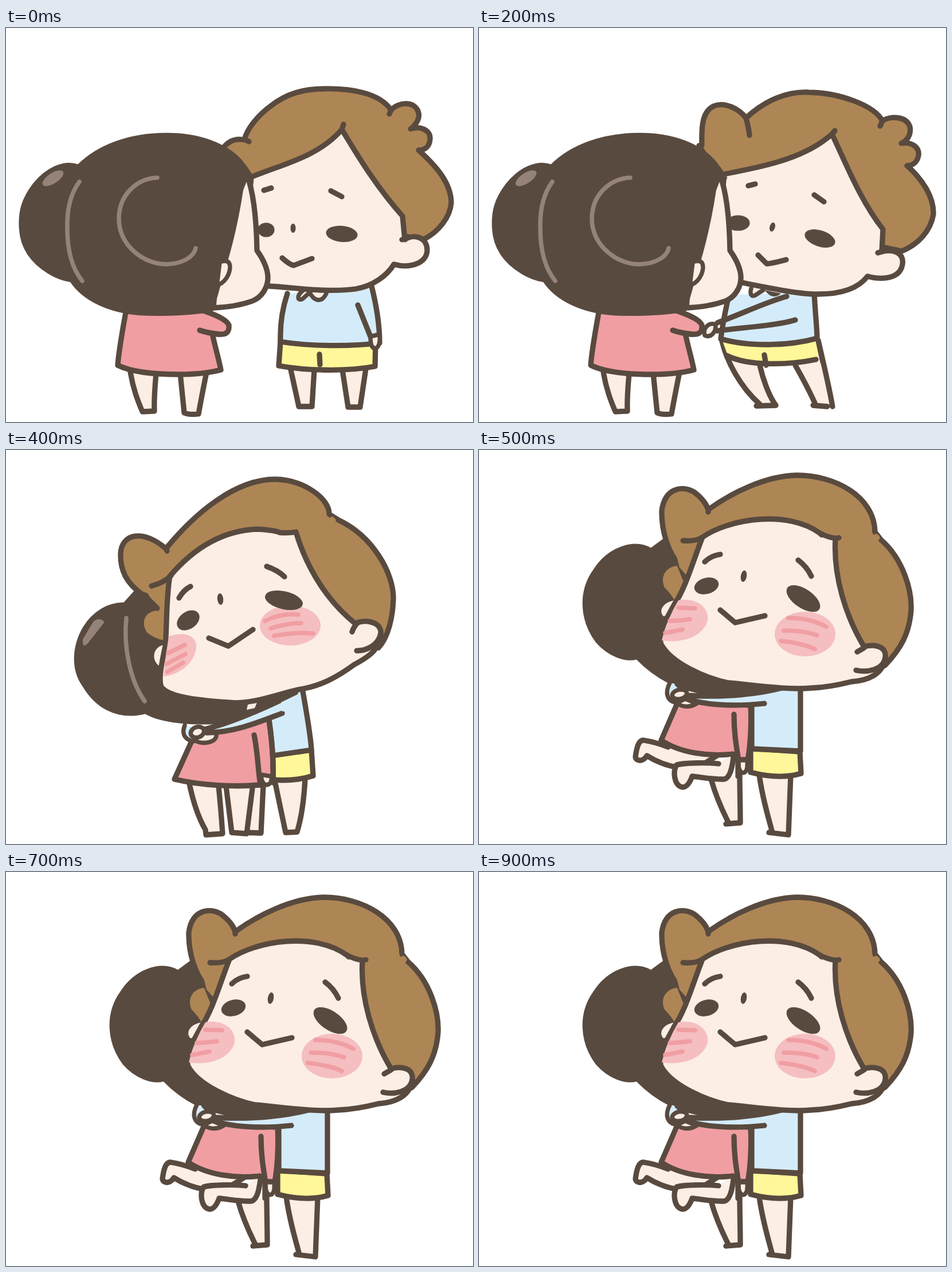
These frames come from a looping animation (815x687 px, 1 s). An HTML page without scripts:

```html
<!DOCTYPE html>
<html lang="en">
<head>
<meta charset="utf-8">
<title>Big hug</title>
<style>
  html, body { margin: 0; width: 100%; height: 100%; overflow: hidden; background: #fff; }
  svg { display: block; width: 100%; height: 100%; }
  svg { --ink: #594a3f; fill: none; stroke: var(--ink); stroke-width: 9.3; stroke-linecap: round; stroke-linejoin: round; }
  .skin { fill: #fceee5; }
  .hair { fill: #ae8655; }
  .dark { fill: var(--ink); stroke-width: 2.5; }
  .pink { fill: #f09ea2; }
  .blue { fill: #d4ecfa; }
  .gold { fill: #fff799; }
  .bare { stroke: none; }
  .thin { stroke-width: 7.5; }
  .dot { fill: var(--ink); stroke-width: 1.2; }
  .shine { stroke: #958379; stroke-width: 7.5; }
  .gloss { fill: #958379; stroke: none; }
  .blush { fill: #f5bec1; stroke: none; }
  .rub { stroke: #f09ea2; stroke-width: 7.5; }

  /* Each pose is held, then cut */
  .pose, .move { animation: 1s step-end infinite; }
  .pose { visibility: hidden; }
  .meet  { animation-name: meet; }
  .lean  { animation-name: lean; }
  .girl  { animation-name: girl; }
  .grab  { animation-name: grab; }
  .hug   { animation-name: hug; }
  .lift  { animation-name: lift; }
  .tilt  { animation-name: tilt; transform-origin: 560px 450px; }
  .sway  { animation-name: sway; transform-origin: 560px 660px; }
  .squash { animation-name: squash; transform-origin: 470px 675px; }
  @keyframes meet { 0% { visibility: visible } 20%, 100% { visibility: hidden } }
  @keyframes girl { 0% { visibility: visible } 30%, 100% { visibility: hidden } }
  @keyframes lean { 20% { visibility: visible } 30%, 100% { visibility: hidden } }
  @keyframes grab { 30% { visibility: visible } 40%, 100% { visibility: hidden } }
  @keyframes hug  { 40% { visibility: visible } 50%, 100% { visibility: hidden } }
  @keyframes lift { 50%, 100% { visibility: visible } }
  @keyframes tilt { 10%, 100% { transform: translate(5px, 4px) rotate(2.5deg) } }
  @keyframes sway { 10%, 100% { transform: skewX(6deg) } }
  @keyframes squash {
    0%, 50%, 70%, 90%, 100% { transform: none }
    60%, 80% { transform: scale(.99, .98) }
  }
</style>
</head>
<body>
<svg viewBox="0 0 815 687" preserveAspectRatio="none">

  <!-- Boy standing -->
  <g class="pose meet">
    <g class="move sway">
      <path class="skin" d="M497 596L511 660H534L538 596M587 596L597 661H618L628 594"/>
      <path class="gold" d="M479 546L476 589C520 597 590 600 644 590L645 548Z"/>
      <path class="blue" d="M491 463C482 490 478 520 479 547C530 555 600 556 652 549C652 520 648 490 638 450"/>
      <path class="skin thin" d="M636 538C636 555 640 560 646 558C652 555 653 546 652 534Z"/>
      <path d="M614 483L636 538M547 569L548 587"/>
      <path class="skin thin" d="M518 458C505 468 510 477 518 472L530 461C536 474 550 482 559 463"/>
    </g>
    <g class="move tilt">
      <path class="hair" d="M376 214C386 197 400 192 416 195C420 176 440 152 462 136C490 114 520 106 555 106C602 105 652 113 672 143C686 128 715 127 720 148C723 160 712 172 706 176C722 170 742 178 740 194C739 208 730 213 720 213C750 240 777 270 777 305C775 330 755 355 730 368L460 330Z"/>
      <path d="M416 194L424 198M672 143L669 150"/>
      <path class="skin" d="M428 260C480 238 545 225 586 177C605 207 640 270 692 328L696 369C712 358 735 365 735 387C735 410 705 420 677 412C665 432 640 450 610 455C560 462 500 452 459 450L415 400Z"/>
      <path d="M586 177L589 168M691 369L697 368"/>
      <g class="dot"><ellipse cx="454" cy="352" rx="14" ry="12"/><ellipse cx="501" cy="349" rx="4" ry="7.5"/><ellipse cx="586" cy="359" rx="27" ry="13.5" transform="rotate(5 586 359)"/></g>
      <path d="M450 283L463 279M567 284L586 294M482 401Q494 412 502 414L534 402"/>
    </g>
  </g>

  <!-- Boy reaching in -->
  <g class="pose lean">
    <path class="skin" d="M424 546C432 580 455 625 490 656L484 659L518 658C505 640 495 610 490 588"/>
    <path class="skin bare" d="M552 570V588C570 620 580 640 587 658L617 660C610 620 600 580 592 545Z"/>
    <path d="M552 588C570 620 580 640 587 656L583 658L608 660M592 545C600 580 610 620 617 660"/>
    <path class="gold bare" d="M424 543L434 571C470 590 540 588 591 578V541Z"/>
    <path class="blue" d="M436 465C430 495 425 515 422 542C470 556 540 555 590 541C590 525 587 500 585 462"/>
    <path d="M432 571C470 590 540 588 588 578M498 570L501 588M592 545L600 582"/>
    <path d="M416 514C460 498 500 478 537 468M416 528C460 522 520 519 552 509"/>
    <path class="skin thin" d="M413 517C400 512 390 525 394 536C405 541 414 530 413 517Z"/>
    <path class="skin thin" d="M475 454C472 465 476 469 482 466L496 457"/>
    <path class="dot" d="M500 458L526 463Q512 474 500 458Z"/>
    <path class="hair" d="M384 205L389 204C388 170 390 145 410 136C430 128 455 142 466 157C500 125 540 110 575 112C630 113 690 135 704 162C716 154 745 152 752 172C755 188 745 198 737 201C755 198 769 208 767 222C765 234 757 240 747 240C775 265 794 295 793 325C788 355 765 378 738 389L460 330Z"/>
    <path d="M466 157C469 168 471 178 472 187M704 162L700 171"/>
    <path class="skin" d="M428 255C470 245 560 235 616 185C640 235 665 300 705 351L703 390C725 385 742 393 739 412C735 437 705 440 678 433C665 450 640 464 592 464C560 465 500 452 459 444L415 390Z"/>
    <path d="M616 185L621 179M696 392L703 390"/>
    <g class="dot"><ellipse cx="452" cy="340" rx="20" ry="13"/><ellipse cx="512" cy="347" rx="4" ry="7.5" transform="rotate(15 512 347)"/><ellipse cx="595" cy="367" rx="27" ry="13.5" transform="rotate(18 595 367)"/></g>
    <path d="M470 275L482 272M585 291L602 303M487 396L502 411Q510 411 536 404"/>
  </g>

  <!-- Girl seen from behind -->
  <g class="pose girl">
    <path class="skin" d="M217 600C222 630 230 650 238 669L259 668C258 645 260 625 262 602M304 602L311 671Q320 675 336 673C340 650 345 625 350 600"/>
    <path class="pink" d="M210 490C203 530 197 560 195 588C215 598 250 604 302 604C335 604 360 600 375 596C372 580 366 560 360 533L372 534C385 535 390 530 389 518C385 508 365 500 345 493Z"/>
    <path d="M338 527Q352 532 372 534"/>
    <path class="skin" d="M420 255C432 285 437 330 438 388C448 402 456 418 457 433C458 452 446 470 430 476C408 484 385 487 362 488L370 380Z"/>
    <path class="dark" d="M126 239C100 230 70 245 48 272C28 298 22 320 24 350C26 385 45 410 75 428C90 437 105 441 113 442C135 475 180 496 235 500C280 502 330 500 360 493C368 470 373 450 378 430C392 390 408 325 416 258L432 262C426 250 420 242 410 230C385 203 340 184 280 184C215 184 160 205 126 239Z"/>
    <path class="skin thin" d="M377 407C391 403 394 415 388 430Q382 443 372 447"/>
    <path class="shine" d="M264 261C230 262 196 290 197 335C199 380 240 412 280 412C310 411 328 398 331 384M128 268C112 290 106 320 107 350C107 390 116 420 133 441"/>
    <ellipse class="gloss" cx="82" cy="262" rx="21" ry="9" transform="rotate(-33 82 262)"/>
  </g>

  <!-- Grab -->
  <g class="pose grab">
    <path class="skin" d="M415 578C420 620 430 640 432 656H450C452 630 452 610 454 584M512 588L516 668L541 667C546 640 548 610 549 578"/>
    <path class="gold" d="M410 530L414 573C450 585 490 592 515 590C540 586 555 575 559 566L556 532Z"/>
    <path class="blue bare" d="M390 440L416 530C440 542 470 545 488 545L555 533L547 455Z"/>
    <path d="M547 458C555 500 558 530 559 566M420 530C440 542 470 545 488 545M494 543L555 533M444 560L446 574"/>
    <path class="skin" d="M270 600C275 630 280 655 287 672L314 672L307 673C312 650 314 630 316 604M355 604L362 676L390 675L394 602"/>
    <path class="pink" d="M276 455C268 510 258 550 250 582C265 597 300 607 350 608C380 606 400 602 408 598C409 545 400 500 390 453Z"/>
    <path class="skin thin" d="M390 553C394 565 397 572 403 572C412 570 412 562 407 555Z"/>
    <path d="M380 522Q386 543 392 558M409 455L406 475"/>
    <path class="dark" d="M200 199C180 188 150 187 128 202C100 218 82 255 81 295C81 345 105 385 163 402C195 440 235 460 310 467C360 465 400 455 422 434L400 300L350 164C280 160 230 175 200 199Z"/>
    <path class="skin" d="M252 468C245 482 246 506 260 507C272 504 278 488 276 472Q272 480 267 470"/>
    <path d="M247 148L261 163M266 144L264 162"/>
    <path class="shine" d="M183 236C170 265 164 310 167 345Q170 375 179 391"/>
    <ellipse class="gloss" cx="134" cy="217" rx="25" ry="13" transform="rotate(-30 134 217)"/>
    <path class="skin bare" d="M340 253C320 256 314 278 322 291Z"/>
    <path class="blue" d="M465 457C430 478 400 486 360 483C344 484 344 498 360 500C400 505 450 505 478 479"/>
    <ellipse class="skin thin" cx="361" cy="491" rx="13" ry="8.5"/>
    <path class="skin thin" d="M420 424L416 438L428 440L436 434V450Q448 458 457 447L440 430Z"/>
    <path class="hair bare" d="M352 198C330 200 320 213 325 232C331 240 340 243 346 243L380 190Z"/>
    <path class="hair" d="M350 200C340 160 338 95 385 84C405 82 418 100 423 113C470 90 540 85 600 98C670 115 715 170 711 252C725 275 738 310 738 340C735 390 705 450 665 455L500 300L360 230Z"/>
    <path d="M711 252L708 259"/>
    <path class="skin" d="M401 172C470 179 560 179 625 178C640 220 655 280 653 340C652 370 650 395 649 415C665 410 672 440 660 447C650 453 630 452 613 442C600 450 580 458 555 459C510 460 450 439 418 427C335 387 296 387 293 350C291 315 318 296 334 274C349 234 373 202 401 172Z"/>
    <path class="thin" d="M410 133L428 142M389 145L428 158"/>
    <g class="dot"><ellipse cx="383" cy="268" rx="26" ry="12.5"/><ellipse cx="450" cy="279" rx="4" ry="8.5" transform="rotate(40 450 279)"/><ellipse cx="540" cy="330" rx="35" ry="17" transform="rotate(41 540 330)"/></g>
    <path d="M411 222Q425 217 435 218M558 251Q572 275 578 300M398 328Q412 347 430 348L468 349"/>
  </g>

  <!-- Hug -->
  <g class="pose hug">
    <path class="skin" d="M320 582C328 620 338 645 348 662L349 671L378 669C376 640 374 615 371 586M421 667L445 668L449 584H430M384 586L394 667L420 669L430 590M468 572L488 667L508 666C516 640 520 610 522 574"/>
    <path class="gold" d="M465 531L533 523L536 568C515 575 490 577 465 575Z"/>
    <path class="blue" d="M517 415C525 460 532 500 533 523L465 533L440 445Z"/>
    <path class="pink" d="M332 490L294 574C340 585 400 588 442 584L466 572C467 545 465 510 458 465Z"/>
    <path class="skin thin" d="M445 566L463 569Q465 583 454 584Q446 582 445 566Z"/>
    <path d="M433 497C440 530 440 565 444 582M459 470C465 510 467 545 466 580"/>
    <path class="dark" d="M215 268C180 262 150 285 135 310C115 345 115 385 135 412C155 445 190 472 243 459C270 475 330 482 400 474Q430 465 455 435L330 280L235 235L205 268Z"/>
    <path class="shine" d="M210 293C205 340 215 400 242 438"/>
    <path class="gloss" d="M152 300Q162 290 172 300L142 338Q133 347 134 330Z"/>
    <path class="skin bare" d="M276 340C257 342 252 366 268 377Z"/>
    <path class="blue thin" d="M312 480C306 495 312 505 327 508L345 488"/>
    <path class="skin thin" d="M328 506C345 515 370 510 367 494L340 490"/>
    <path class="blue" d="M505 424C460 446 400 474 347 487L350 493C400 492 440 475 482 459"/>
    <path class="blue bare" d="M513 424L480 440L482 456L515 450Z"/>
    <ellipse class="skin thin" cx="334" cy="492" rx="12" ry="9" transform="rotate(-20 334 492)"/>
    <path class="skin bare" d="M422 444L440 436L434 450L420 453Z"/>
    <path class="hair bare" d="M225 240L266 280C243 280 234 300 246 318Q262 331 280 332L300 230Z"/>
    <path class="hair" d="M238 252C210 232 199 210 200 180C202 145 240 138 279 172C330 110 400 51 470 51C520 52 565 85 564 112L580 122C640 150 677 215 676 260C675 290 668 325 650 345L450 300L285 330L286 225Q262 262 238 252Z"/>
    <path class="hair bare" d="M230 220L300 200L284 245L262 275Z"/>
    <path stroke="#ae8655" d="M569 121L571 123"/>
    <path class="skin" d="M286 220C320 180 370 140 440 138Q470 140 478 144Q495 145 506 143C520 190 550 255 610 303C620 295 656 297 654 320C652 345 640 357 608 374C575 398 550 410 520 416C490 420 450 439 400 441C340 437 285 432 271 413C266 400 271 375 278 342C281 310 279 260 286 220Z"/>
    <path d="M254 237Q275 232 288 219M279 172L281 176M240 252L264 276M604 317Q607 308 613 302M654 320C650 340 630 350 612 350"/>
    <path class="blush" d="M284 325C310 316 333 322 332 345C328 375 300 392 275 395Q278 360 284 325Z"/>
    <ellipse class="blush" cx="496" cy="306" rx="53" ry="35"/>
    <path class="rub" d="M283 354L312 340M280 373L313 356M281 387L309 371M452 298Q480 284 510 287M462 311Q490 302 515 302M468 324Q505 317 536 320"/>
    <g class="dot"><ellipse cx="318" cy="297" rx="21" ry="14.5" transform="rotate(-35 318 297)"/><ellipse cx="374" cy="260" rx="4.5" ry="9.5" transform="rotate(-6 374 260)"/><ellipse cx="485" cy="262" rx="33" ry="15" transform="rotate(13 485 262)"/></g>
    <path d="M302 258Q310 244 322 238M455 203Q475 210 486 221M354 328L388 342L431 313"/>
  </g>

  <!-- Lifted off the ground -->
  <g class="pose lift"><g class="move squash">
    <path class="skin" d="M405 574C415 610 428 635 436 651L431 652L456 650C456 620 455 590 455 568M489 566C495 610 505 640 512 667L506 667L540 671L544 566"/>
    <path class="gold" d="M474 520L560 526L562 564C535 572 505 570 474 562Z"/>
    <path class="blue" d="M561 412V525L476 521V440L520 410Z"/>
    <path class="skin" d="M330 518C310 510 300 508 287 506C278 506 275 520 273 535C275 545 288 542 293 533C320 550 350 557 380 555L420 530"/>
    <path class="skin" d="M445 528C442 555 438 575 425 574C405 574 385 570 372 569C368 580 362 588 355 588C340 585 338 560 345 549C360 545 400 545 418 547"/>
    <path class="pink" d="M348 437L318 506C350 528 400 535 443 530L452 540H469C473 520 476 480 474 445Z"/>
    <path class="skin thin" d="M453 541H468Q470 563 460 563Q452 560 453 541Z"/>
    <path d="M445 461C445 490 448 510 452 535V569"/>
    <path class="dark" d="M300 172C270 155 225 170 200 210C175 245 175 295 205 335C225 358 255 370 275 364C310 400 350 420 405 427C430 430 480 427 532 414L400 300L330 150Z"/>
    <path class="skin bare" d="M344 262C322 264 312 280 322 290L340 285Z"/>
    <path class="blue thin" d="M333 406C323 425 330 438 342 440L365 428L345 408"/>
    <path class="blue bare" d="M365 428C430 432 490 425 530 415L498 442C460 446 410 447 370 437Z"/>
    <path d="M528 415C490 425 430 432 365 428M498 442C460 446 410 447 368 436"/>
    <path class="skin thin" d="M344 441Q362 453 380 442L360 434Z"/>
    <ellipse class="skin thin" cx="350" cy="426" rx="13" ry="8" transform="rotate(-12 350 426)"/>
    <path class="hair bare" d="M352 202C330 200 314 218 324 240Q336 252 341 262L390 190Z"/>
    <path class="hair" d="M350 200C330 180 318 140 319 105C325 65 355 62 375 73Q395 88 400 104C440 75 500 45 555 44C620 44 690 80 691 143L702 157C740 190 756 245 754 280C751 320 736 347 708 376L500 300L360 225Z"/>
    <path class="hair bare" d="M340 165L390 155L365 222L350 205Z"/>
    <path stroke="#ae8655" d="M693 151L695 153"/>
    <path class="skin" d="M390 152C440 118 540 105 595 145Q608 152 622 154C618 220 640 290 672 343C690 338 712 342 709 362C706 390 680 402 650 404Q610 414 580 415C540 419 480 410 435 406C400 399 335 373 317 337C315 310 330 290 341 269C361 240 373 195 390 152Z"/>
    <path d="M356 158Q378 160 390 152M595 145L598 148M622 154L628 153M400 104V108M660 352L672 345M709 362C705 385 675 388 658 384"/>
    <path class="blush" d="M348 262C380 256 402 275 399 297C392 325 355 338 319 332Q328 295 348 262Z"/>
    <ellipse class="blush" cx="569" cy="321" rx="53" ry="39"/>
    <path class="rub" d="M348 275L377 276M333 298Q350 298 368 295M325 319Q340 316 355 313M540 293Q575 292 606 308M532 315Q565 314 590 323M527 333Q565 337 586 347"/>
    <g class="dot"><ellipse cx="397" cy="237" rx="21" ry="13.5" transform="rotate(-15 397 237)"/><ellipse cx="462" cy="220" rx="4.5" ry="9.5" transform="rotate(10 462 220)"/><ellipse cx="566" cy="259" rx="33" ry="16" transform="rotate(34 566 259)"/></g>
    <path d="M394 195Q405 184 421 182M557 192Q572 203 580 220M421 279L447 301L499 289"/>
  </g></g>
</svg>
</body>
</html>
```
